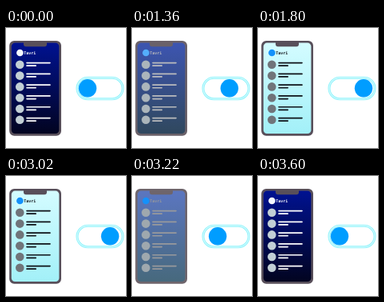
Recreate the animation shown at these times as an HTML page with a canvas. Size 150 by 150 pixels, loop 3.62 s.

```html
<!DOCTYPE html>
<html lang="en">
<head>
<meta charset="utf-8">
<title>Theme switch</title>
<style>
html, body { margin: 0; width: 100%; height: 100%; overflow: hidden; background: #fff; }
canvas { display: block; width: 100vw; height: 100vh; }
</style>
</head>
<body>
<canvas id="stage"></canvas>
<script>
const SIZE = 150, LOOP = 3620, STEP = 20;
const TO_LIGHT = 1208, TO_DARK = 3008, DURATION = 592;
const canvas = document.getElementById('stage');
const ctx = canvas.getContext('2d');
const ratio = window.devicePixelRatio || 1;
canvas.width = canvas.height = SIZE * ratio;
ctx.scale(ratio, ratio);

const mix = (a, b, k) =>
  `rgb(${a.map((v, i) => Math.round(v + (b[i] - v) * k)).join(',')})`;

const bezier = (a, b, s) =>
  3 * a * s * (1 - s) ** 2 + 3 * b * s * s * (1 - s) + s ** 3;

// Ease out with a slight overshoot: cubic-bezier(.45, 1.45, .8, 1)
function easeOutBack(x) {
  if (x <= 0) return 0;
  if (x >= 1) return 1;
  let lo = 0, hi = 1;
  for (let i = 0; i < 24; i++) {
    const mid = (lo + hi) / 2;
    if (bezier(0.45, 0.8, mid) < x) lo = mid; else hi = mid;
  }
  return bezier(1.45, 1, lo);
}

function stateAt(time) {
  const back = time >= TO_DARK;
  const slide = easeOutBack((time - (back ? TO_DARK : TO_LIGHT)) / DURATION);
  const fade = Math.min(1, slide) ** 3;
  return back ? { slide: 1 - slide, light: 1 - fade } : { slide, light: fade };
}

function box(x, y, w, h, r, fill) {
  ctx.beginPath();
  ctx.roundRect(x, y, w, h, r);
  ctx.fillStyle = fill;
  ctx.fill();
}

function disc(x, y, r, fill) {
  ctx.beginPath();
  ctx.arc(x, y, r, 0, Math.PI * 2);
  ctx.fillStyle = fill;
  ctx.fill();
}

function drawPhone(light) {
  const bezel = mix([88, 79, 90], [110, 101, 108], 4 * light * (1 - light));
  const ink = mix([255, 255, 255], [14, 18, 24], light);
  const avatar = mix([194, 207, 213], [112, 116, 122], light);

  box(4.2, 16, 64.8, 118.7, 6, bezel);
  const screen = ctx.createLinearGradient(0, 18.5, 0, 132);
  screen.addColorStop(0, mix([0, 18, 145], [212, 252, 255], light));
  screen.addColorStop(1, mix([2, 4, 32], [162, 240, 248], light));
  box(6.8, 18.6, 59.6, 113.4, 4.5, screen);
  box(22, 18, 29, 5.2, [0, 0, 3, 3], bezel);

  disc(17.4, 31, 4.3, mix([245, 248, 255], [20, 145, 250], Math.min(1, light * 2.5)));
  ctx.fillStyle = ink;
  ctx.font = 'bold 5px "DejaVu Sans Mono", monospace';
  ctx.textBaseline = 'alphabetic';
  ctx.fillText('Tavri', 22.2, 32.8);

  for (let i = 0; i < 6; i++) {
    const y = 45.8 + i * 13.8;
    disc(17.3, y, 5.3, avatar);
    box(25.2, y - 3.1, 30.6, 1.7, 0.8, ink);
    box(25.2, y + 0.5, 12.8, 1.7, 0.8, ink);
  }
}

function drawSwitch(slide) {
  ctx.beginPath();
  ctx.roundRect(89, 62.2, 57, 26.6, 13.3);
  for (const [width, colour] of [[3, '#8df3fb'], [1.2, '#d6fbfe']]) {
    ctx.strokeStyle = colour;
    ctx.lineWidth = width;
    ctx.stroke();
  }
  disc(102 + 30 * slide, 75.3, 11.2, '#009dff');
}

function draw(now) {
  const time = Math.floor((now % LOOP) / STEP) * STEP;
  const { slide, light } = stateAt(time);
  ctx.fillStyle = '#fff';
  ctx.fillRect(0, 0, SIZE, SIZE);
  drawPhone(light);
  drawSwitch(slide);
}

const start = performance.now();
function tick() {
  draw(performance.now() - start);
  requestAnimationFrame(tick);
}
tick();
</script>
</body>
</html>
```
